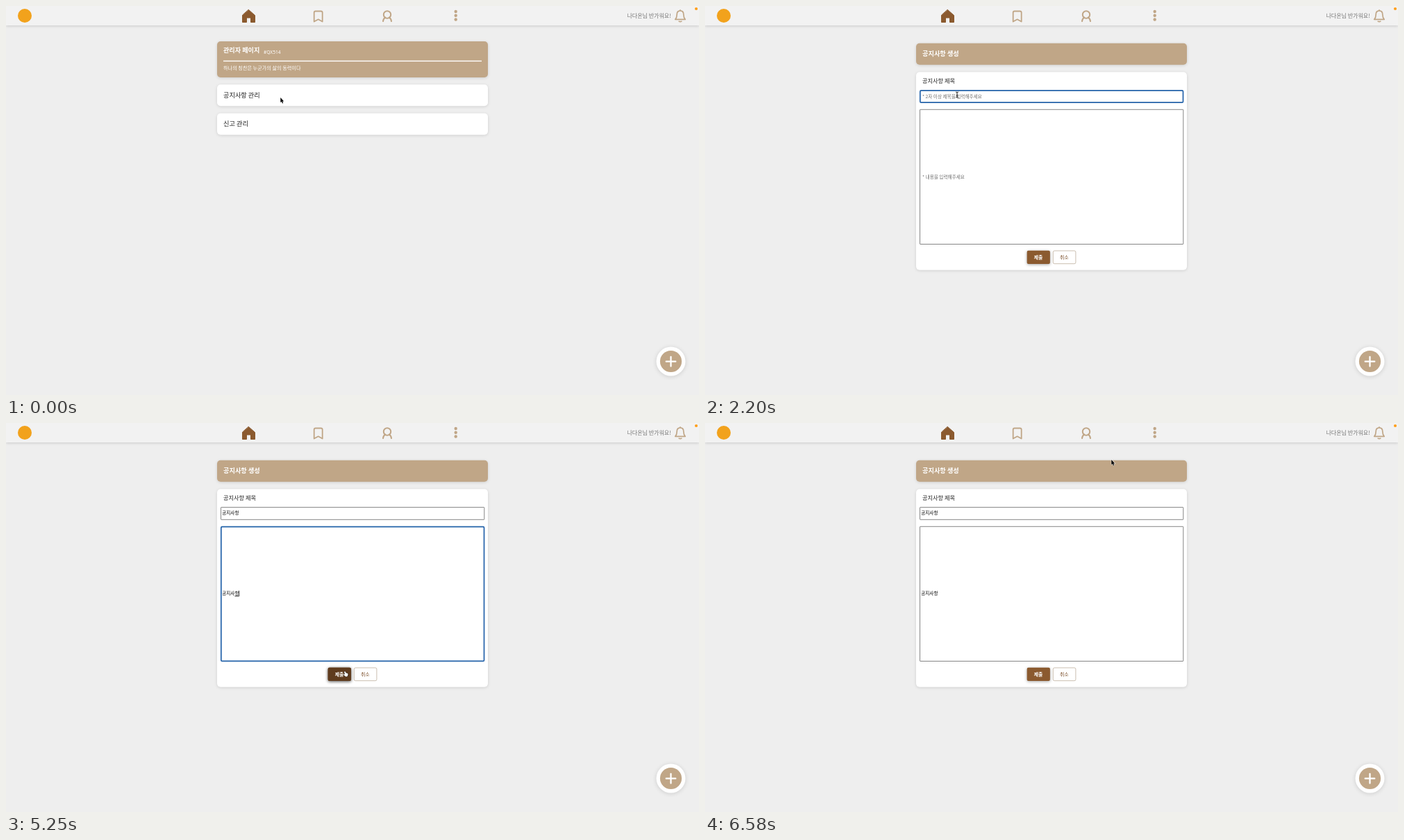
Animation, 998 px wide and 561 px high, one loop 6.65 s. Source, as an HTML page with a canvas:

```html
<!DOCTYPE html>
<html lang="ko">
<head>
<meta charset="utf-8">
<style>
html, body { margin: 0; width: 100%; height: 100%; overflow: hidden; background: #eee; }
canvas { display: block; width: 998px; height: 561px; }
</style>
</head>
<body>
<canvas id="stage"></canvas>
<script>
const W = 998, H = 561, LOOP = 6650, STEP = 50;
const TAN = '#c0a687', BROWN = '#8b5a2f', DARK = '#5f3c1e', INK = '#222';
const SANS = '"Noto Sans CJK KR", "Noto Sans CJK", "Noto Sans", sans-serif';

const canvas = document.getElementById('stage');
const dpr = window.devicePixelRatio || 1;
canvas.width = W * dpr;
canvas.height = H * dpr;
const c = canvas.getContext('2d');

// Keystrokes of the composed word
const WORD = ['ㄱ', '고', '공', '공ㅈ', '공지', '공짓', '공지사', '공지샇', '공지사하', '공지사항'];
const TITLE_KEYS = [2350, 2400, 2450, 2750, 2850, 2950, 3050, 3150, 3250, 3300];
const BODY_KEYS = [4000, 4100, 4200, 4300, 4350, 4450, 4550, 4650, 4700, 4750];

// Pointer path: time, x, y
const PATH = [
  [850, 395, 132], [1150, 378, 112], [1500, 378, 112], [1800, 363, 128],
  [3550, 363, 128], [3750, 433, 248], [5000, 433, 248], [5200, 487, 359],
  [5750, 487, 359], [6000, 513, 234], [6300, 585, 53]
];

const clamp = v => Math.max(0, Math.min(1, v));
const ramp = (t, a, b) => clamp((t - a) / (b - a));
const smooth = p => p * p * (3 - 2 * p);

function box(x, y, w, h, r, fill, shadow) {
  c.save();
  if (shadow) {
    c.shadowColor = `rgba(0,0,0,${shadow})`;
    c.shadowBlur = 4 * dpr;
    c.shadowOffsetY = dpr;
  }
  c.fillStyle = fill;
  c.beginPath();
  c.roundRect(x, y, w, h, r);
  c.fill();
  c.restore();
}

function frame(x, y, w, h, r, color, width) {
  c.strokeStyle = color;
  c.lineWidth = width;
  c.beginPath();
  c.roundRect(x, y, w, h, r);
  c.stroke();
}

function disc(x, y, r, fill) {
  c.fillStyle = fill;
  c.beginPath();
  c.arc(x, y, r, 0, 7);
  c.fill();
}

// y is the visual middle of the line
function text(s, x, y, size, color = INK, weight = 400, family = SANS) {
  c.font = `${weight} ${size}px ${family}`;
  c.fillStyle = color;
  c.fillText(s, x, y + size * 0.37);
  return c.measureText(s).width;
}

function shape(d, x, y, fill, stroke, width) {
  const p = new Path2D(d);
  c.save();
  c.translate(x, y);
  c.lineJoin = c.lineCap = 'round';
  if (stroke) {
    c.strokeStyle = stroke;
    c.lineWidth = width;
    c.stroke(p);
  }
  if (fill) {
    c.fillStyle = fill;
    c.fill(p);
  }
  c.restore();
}

function header() {
  box(0, -6, W, 34, 0, '#f2f2f2', 0.16);
  disc(27, 14, 10, '#f2a21c');
  shape('M0 -9 L9 -1 V9 H3 V2.5 H-3 V9 H-9 V-1 Z', 349.5, 14.5, BROWN, BROWN, 1);
  shape('M-6 7.5 V-5.5 Q-6 -7.5 -4 -7.5 H4 Q6 -7.5 6 -5.5 V7.5 L0 4.3 Z', 449.7, 15, null, TAN, 1.8);
  c.strokeStyle = TAN;
  c.lineWidth = 2;
  c.beginPath();
  c.arc(549, 12.5, 5.2, 0, 7);
  c.stroke();
  shape('M-6 7.5 Q-5.6 3.2 -2.7 2 M6 7.5 Q5.6 3.2 2.7 2', 549, 14.6, null, TAN, 2);
  for (const y of [8, 13.8, 19.5]) disc(647.7, y, 2.2, TAN);
  text('나다온님 반가워요!', 894.5, 14.5, 8, '#777');
  shape('M-7.2 5 Q-4.8 2.5 -4.8 -2 Q-4.8 -7.4 0 -7.4 Q4.8 -7.4 4.8 -2 Q4.8 2.5 7.2 5 Z M-1.8 7.8 Q0 9 1.8 7.8 M0 -7.6 V-8.4',
    971, 14.3, null, TAN, 1.7);
  disc(994, 4, 2.1, '#ff9f1a');
}

function addButton() {
  c.save();
  c.shadowColor = 'rgba(0,0,0,.14)';
  c.shadowBlur = 6 * dpr;
  c.shadowOffsetY = dpr;
  disc(957.5, 512.5, 21, '#fff');
  c.restore();
  disc(957.5, 512.5, 15.6, TAN);
  shape('M-6.8 0 H6.8 M0 -6.8 V6.8', 957.5, 512.7, null, '#fff', 2.3);
}

const card = (y, h, fill = '#fff') => box(304, y, 390, h, 5, fill, 0.13);

function row(y, label) {
  card(y, 31);
  text(label, 313, y + 15.2, 9.2);
}

function banner(label) {
  card(53.7, 31, TAN);
  text(label, 313, 69, 9.2, '#fff', 700);
}

function adminPage() {
  card(51, 52, TAN);
  text('관리자 페이지', 313, 63.5, 9.1, '#fff', 700);
  text('#QX514', 371, 66.3, 6.6, '#fff', 400, '"Noto Sans", sans-serif');
  c.fillStyle = '#fff';
  c.fillRect(313, 78.7, 372, 1.4);
  text('하나의 칭찬은 누군가의 삶의 동력이다', 313, 89.7, 7.15, '#fff', 500);
  row(113.3, '공지사항 관리');
  row(154.8, '신고 관리');
}

function noticePage() {
  banner('공지사항 관리 페이지');
  row(95.3, '공지사항 생성');
  row(136.8, '공지사항 조회 / 삭제');
}

function field(t, y, h, mid, hint, keys, focusAt, blurAt) {
  const focused = t >= focusAt && t < blurAt;
  if (focused) frame(309.8, y + 0.3, 378.7, h - 0.4, 1.5, '#2362a9', 1.7);
  else frame(309.5, y, 379.3, h, 0.5, '#858585', 1);

  const typed = keys.filter(k => t >= k).length;
  let end = 311.2;
  if (typed) {
    const s = WORD[typed - 1];
    end += text(s, 311.2, mid, 6.6, '#000', 500);
    if (focused) {
      c.fillStyle = '#000';
      c.fillRect(end - 6, mid + 3.6, 6, 0.8);
    }
  } else {
    text(hint, 313, mid + 0.4, 6.63, '#707070');
  }
  // The caret blinks from the latest keystroke
  const since = typed ? keys[typed - 1] : focusAt;
  if (focused && (t - since) % 500 < 250) {
    c.fillStyle = '#000';
    c.fillRect(end, mid - 4, 0.7, 8);
  }
}

function formPage(t) {
  banner('공지사항 생성');
  card(95.3, 285.5);
  text('공지사항 제목', 313, 108, 8.2);
  field(t, 121.6, 17.7, 130, '* 2자 이상 제목을 입력해주세요', TITLE_KEYS, 1950, 3750);
  field(t, 149.3, 194.2, 245.8, '* 내용을 입력해주세요', BODY_KEYS, 3750, 5450);

  box(463.7, 352.7, 33.2, 19.3, 2, BROWN, 0.35);
  c.globalAlpha = ramp(t, 5100, 5225) * (1 - ramp(t, 6425, 6550));
  box(463.7, 352.7, 33.2, 19.3, 2, DARK, 0.4);
  c.globalAlpha = 1;
  text('제출', 473.7, 362.3, 6.9, '#fff', 700);
  frame(501.3, 353, 32.6, 18.7, 2, '#c5b7a7', 0.9);
  text('취소', 511, 362.3, 6.9, '#7a4d28', 500);
}

function dialog(t) {
  c.globalAlpha = ramp(t, 5700, 5800) * (1 - ramp(t, 6350, 6400));
  if (!c.globalAlpha) return;
  c.save();
  c.shadowColor = 'rgba(0,0,0,.4)';
  c.shadowBlur = 6 * dpr;
  c.shadowOffsetY = dpr;
  c.fillStyle = '#fff';
  c.beginPath();
  c.roundRect(382.5, -6, 233, 73.7, 3.5);
  c.fill();
  c.restore();
  text('bgh-mv6-crew48.naboruneda.test', 391, 14, 7.4);
  text('내용:', 517.8, 14, 7.2);
  text('공지사항이 업로드되셨습니다.', 391, 29.5, 6.35);
  box(573.8, 42.4, 33.2, 16.8, 2, '#1a73e8');
  text('확인', 584.6, 50.8, 6.2, '#fff', 700);
  c.globalAlpha = 1;
}

function pointer(t) {
  if ((t >= 2350 && t < 3600) || (t >= 4000 && t < 5000)) return;
  let [, x, y] = PATH[0];
  for (let i = 1; i < PATH.length; i++) {
    const [a, x0, y0] = PATH[i - 1], [b, x1, y1] = PATH[i];
    if (t < a) break;
    const p = smooth(ramp(t, a, b));
    x = x0 + (x1 - x0) * p;
    y = y0 + (y1 - y0) * p;
  }
  const onForm = t >= 1500 && t < 5700;
  if (onForm && y > 352) {
    shape('M0 0 Q1 -1.3 2 0 L2.6 1.6 Q4.6 1 5.6 3 L5 6 Q3.6 7.4 1.8 6.4 L-1 4 Q-1 2.8 1 3.4 Z', x, y, '#fff', '#111', 0.9);
  } else if (onForm && ((y > 121 && y < 140) || (y > 149 && y < 344))) {
    shape('M-1.6 -4 Q0 -4 0 -3 V3 Q0 4 -1.6 4 M1.6 -4 Q0 -4 0 -3 M0 3 Q0 4 1.6 4 M-1 1 H1', x, y, null, '#111', 0.9);
  } else {
    shape('M0.3 0 V7.2 L1.9 5.8 L3 8.4 L4.2 7.9 L3.1 5.4 H5.2 Z', x, y, '#000', '#fff', 0.9);
  }
}

function draw(now) {
  const raw = now % LOOP;
  const t = raw >= 6550 ? raw : Math.floor(raw / STEP) * STEP;
  c.setTransform(dpr, 0, 0, dpr, 0, 0);
  c.globalAlpha = 1;
  c.fillStyle = '#eee';
  c.fillRect(0, 0, W, H);
  header();
  if (t < 850) adminPage();
  else if (t < 1500) noticePage();
  else formPage(t);
  addButton();
  dialog(t);
  c.globalAlpha = 1;
  pointer(t);
}

const start = performance.now();
function tick() {
  draw(performance.now() - start);
  requestAnimationFrame(tick);
}
tick();
</script>
</body>
</html>
```
